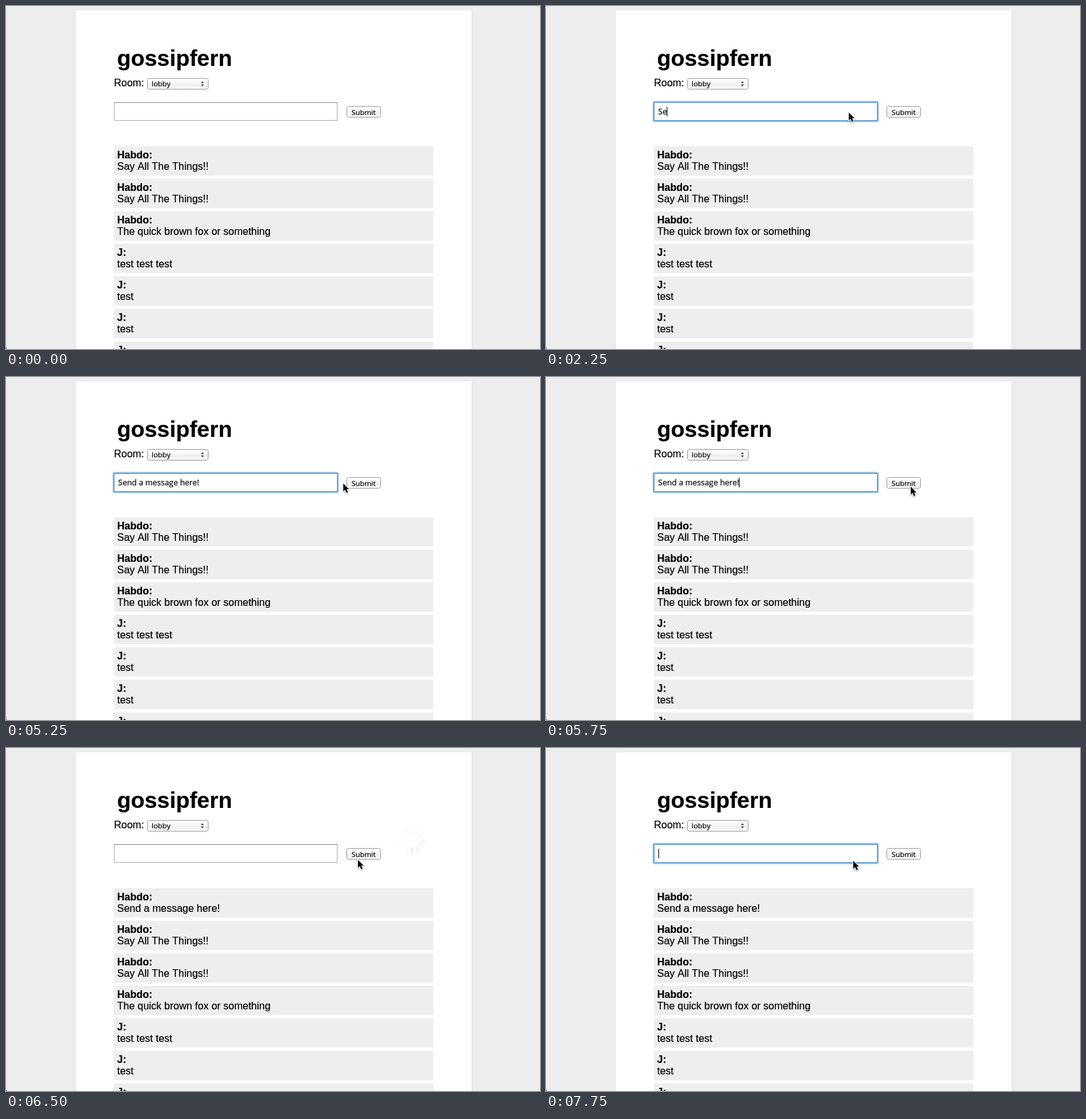
Write an HTML page that moves like this. It is 836 by 538 pixels and loops after 8 s.

```html
<!DOCTYPE html>
<html lang="en">
<head>
<meta charset="utf-8">
<title>Chat room</title>
<style>
  html, body { margin: 0; width: 100%; height: 100%; overflow: hidden; background: #ededed; }
  svg { display: block; }
  text {
    font: 16px "Liberation Sans", Arial, sans-serif; font-kerning: none; white-space: pre;
    stroke: #000; stroke-width: .2px;
  }
  .bold { font-weight: bold; }
  .title { font-size: 35.2px; font-weight: bold; }
  .ui { font: 11.4px "Open Sans", "Noto Sans", sans-serif; font-kerning: none; }
  .typed { font-size: 12.45px; }
  #button rect { fill: url(#face); stroke: #9b9b9b; }
  #button.down rect { fill: url(#pressed); stroke: #6d7f9c; }
  #button.off rect { stroke: #c6c6c6; }
  #button.off text { fill: #808080; stroke: #808080; }
</style>
</head>
<body>
<svg width="836" height="538" viewBox="0 0 836 538">
  <defs>
    <linearGradient id="face" x2="0" y2="1">
      <stop offset="0" stop-color="#fff"/>
      <stop offset=".5" stop-color="#f6f6f6"/>
      <stop offset=".52" stop-color="#eee"/>
      <stop offset="1" stop-color="#fafafa"/>
    </linearGradient>
    <linearGradient id="pressed" x2="0" y2="1">
      <stop offset="0" stop-color="#c4dcf5"/>
      <stop offset=".5" stop-color="#8fbdee"/>
      <stop offset="1" stop-color="#b9dcfa"/>
    </linearGradient>
  </defs>

  <rect width="836" height="538" fill="#ededed"/>
  <rect x="109" y="7" width="620" height="531" fill="#fff"/>
  <path d="M108.5 7V538M729.5 7V538" stroke="#e0e0e0"/>
  <rect y="537" width="1" height="1"/>

  <text class="title" x="174" y="94">gossipfern</text>
  <text x="169" y="126">Room:</text>

  <rect x="221.5" y="113.5" width="95" height="17" rx="3" fill="url(#face)" stroke="#9b9b9b"/>
  <text class="ui" x="228" y="126">lobby</text>
  <path d="M305.2 121l2.3-3 2.3 3zM305.2 123l2.3 3 2.3-3z" fill="#444"/>

  <rect x="169.5" y="151.5" width="349" height="28" fill="#fff" stroke="#acacac"/>
  <path d="M169 151.5h350" stroke="#8f8f8f"/>
  <g id="ring" fill="none">
    <rect x="168" y="150" width="352" height="31" rx="2" stroke="#a9cbea" stroke-width="3" opacity=".75"/>
    <rect x="169" y="151" width="350" height="29" rx="1" stroke="#67a2d6" stroke-width="2"/>
  </g>
  <text class="ui typed" id="typed" x="175.6" y="170"></text>
  <rect id="caret" y="158" width="1" height="15"/>

  <g id="button">
    <rect x="533.5" y="157.5" width="53" height="17" rx="3"/>
    <text class="ui" x="541" y="171">Submit</text>
  </g>

  <g id="spinner" stroke="#000" stroke-width="3"></g>
  <g id="list"></g>

  <path id="cursor" d="M0 0V12.4L2.9 9.8L5 14.8L7.3 13.8L5.2 9H9Z"
        stroke="#fff" stroke-width="2" stroke-linejoin="round" paint-order="stroke"
        style="filter:drop-shadow(0 1px 1px rgba(0,0,0,.35))"/>
</svg>

<script>
const LOOP = 8000;
const MESSAGE = 'Send a message here!';
const SAY = ['Habdo:', 'Say All The Things!!'];
const ROWS = [
  ['Habdo:', MESSAGE], SAY, SAY, ['Habdo:', 'The quick brown fox or something'],
  ['J:', 'test test test'], ['J:', 'test'], ['J:', 'test'], ['J:', 'test']
];
const START = { at: null, focus: 0, caret: 0, typed: 0, button: '', spin: 0, head: 0, sent: 0 };

// Each step changes only the values it names.
const STEPS = [
  [250, { at: [823, 1] }],
  [500, { at: [474, 161] }],
  [1000, { at: [474, 167] }],
  [1250, { focus: 1, caret: 1 }],
  [1750, { caret: 0 }],
  [2250, { caret: 1, typed: 2 }],
  [2500, { typed: 4 }],
  [2750, { typed: 6 }],
  [3000, { typed: 8 }],
  [3250, { typed: 10 }],
  [3500, { typed: 12 }],
  [3750, { typed: 14 }],
  [4000, { typed: 17 }],
  [4250, { typed: 19 }],
  [4750, { typed: 20 }],
  [5250, { caret: 0, at: [528, 167] }],
  [5500, { at: [560, 171] }],
  [5750, { caret: 1, at: [571, 172] }],
  [6000, { focus: 0, caret: 0, button: 'down' }],
  [6250, { typed: 0, button: 'off', spin: 1, head: 1 }],
  [6500, { button: '', spin: .07, head: 3, sent: 1, at: [551, 175.5] }],
  [6750, { spin: 0, at: [506, 177] }],
  [7000, { at: [481, 177] }],
  [7500, { focus: 1, caret: 1 }]
];

const $ = id => document.getElementById(id);
const show = (el, on) => el.setAttribute('visibility', on ? 'visible' : 'hidden');

function add(parent, tag, attrs, text = '') {
  const el = document.createElementNS('http://www.w3.org/2000/svg', tag);
  for (const key in attrs) el.setAttribute(key, attrs[key]);
  el.textContent = text;
  return parent.appendChild(el);
}

const slots = Array.from({ length: 7 }, (_, i) => {
  const y = 220 + 51 * i;
  add($('list'), 'rect', { x: 169, y, width: 500, height: 46, fill: '#eee' });
  return [
    add($('list'), 'text', { x: 174, y: y + 19, class: 'bold' }),
    add($('list'), 'text', { x: 174, y: y + 37 })
  ];
});

const spokes = Array.from({ length: 12 }, (_, i) =>
  add($('spinner'), 'path', { d: 'M10.5 0H22', transform: `translate(636 145.5) rotate(${i * 30})` }));

function stateAt(time) {
  return STEPS.reduce((s, [t, change]) => t <= time ? { ...s, ...change } : s, START);
}

function draw(s) {
  const text = MESSAGE.slice(0, s.typed);
  $('typed').textContent = text;
  const width = text ? $('typed').getComputedTextLength() : 0;
  $('caret').setAttribute('x', Math.floor(176 + width));
  show($('caret'), s.caret);
  show($('ring'), s.focus);
  $('button').setAttribute('class', s.button);

  $('spinner').setAttribute('opacity', s.spin);
  spokes.forEach((spoke, i) => {
    const lag = (s.head - i + 12) % 12;
    spoke.setAttribute('opacity', Math.max(.25, 1 - lag * .17));
  });

  slots.forEach((slot, i) => slot.forEach((el, j) => {
    el.textContent = ROWS[i + 1 - s.sent][j];
  }));

  show($('cursor'), s.at);
  if (s.at) $('cursor').setAttribute('transform', `translate(${s.at})`);
}

const began = performance.now();
let last = '';
function tick() {
  const state = stateAt((performance.now() - began) % LOOP);
  const key = JSON.stringify(state);
  if (key !== last) draw(state);
  last = key;
  requestAnimationFrame(tick);
}
tick();
</script>
</body>
</html>
```
